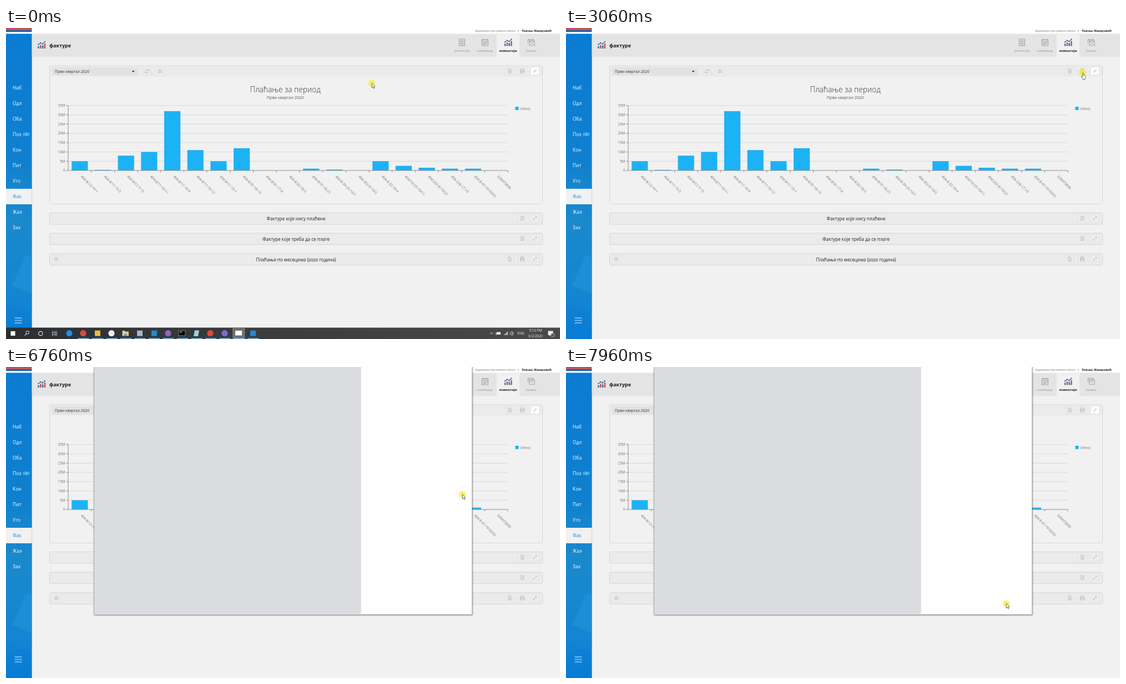
Recreate the animation shown at these times as an HTML page. Size 998x561 px, loop 8000 ms.

```html
<!DOCTYPE html>
<html lang="sr">
<head>
<meta charset="utf-8">
<style>
html, body { margin: 0; width: 100%; height: 100%; overflow: hidden; background: #f1f1f1; }
svg { display: block; width: 998px; height: 561px; font-family: "Open Sans", "Noto Sans", sans-serif; }
</style>
</head>
<body>
<svg id="stage" viewBox="0 0 998 561"></svg>
<script>
const LOOP = 8000;
const stage = document.getElementById('stage');

const attrs = o => Object.entries(o).map(([k, v]) => `${k}="${v}"`).join(' ');
const rect = (x, y, width, height, fill, more = {}) => `<rect ${attrs({ x, y, width, height, fill, ...more })}/>`;
const circle = (cx, cy, r, fill, more = {}) => `<circle ${attrs({ cx, cy, r, fill, ...more })}/>`;
const path = (d, stroke, width = 1, fill = 'none') => `<path ${attrs({ d, stroke, fill, 'stroke-width': width })}/>`;
const text = (s, x, y, size, fill, more = {}) => `<text ${attrs({ x, y, 'font-size': size, fill, ...more })}>${s}</text>`;
const at = (x, y, body) => `<g transform="translate(${x} ${y})">${body}</g>`;
const group = (id, body) => `<g id="${id}">${body}</g>`;
const mid = { 'text-anchor': 'middle' };
const bold = { 'font-weight': 700 };

// Icons are drawn around their own centre.
const icons = {
  file: c => path('M-2.5-3.8H1L3-1.8V3.8H-2.5ZM1-3.8V-1.8H3M-1 .2H1.5M-1 2H1.5', c, .8),
  print: c => path('M-2.5-1.2V-3.8H2.5V-1.2M-2.5 2.2H-4V-1.2H4V2.2H2.5M-2.5 .8H2.5V3.8H-2.5Z', c, .75),
  expand: c => path('M-2.8 2.8L2.8-2.8M.6-2.8H2.8V-.6M-2.8 .6V2.8H-.6', c, .8),
  shrink: c => path('M-3 3L-.5 .5M3-3L.5-.5M-2.4 .5H-.5V2.4M.5-2.4V-.5H2.4', c, .8),
  refresh: c => path('M-3.3-.6A3.4 3.4 0 0 1 2.9-1.8M3.3-3.6V-1.3H1M3.3 .6A3.4 3.4 0 0 1-2.9 1.8M-3.3 3.6V1.3H-1', c, .9),
  sliders: c => path('M-4-2.5H4M-4 0H4M-4 2.5H4M-1.8-3.4V-1.6M1.8-.9V.9M-.8 1.6V3.4', c, .8),
  cabinet: c => path('M-5-6.3H5V6.3H-5ZM-5-2.1H5M-5 2.1H5M-1.7-4.2H1.7M-1.7 0H1.7M-1.7 4.2H1.7', c, 1.1),
  calendar: c => path('M-5.5-4.8H5.5V6H-5.5ZM-5.5-2H5.5M-3-6.5V-4M3-6.5V-4', c, 1.2)
    + path('M-3.5 .3H4M-3.5 2.2H4M-3.5 4.1H2', c, 1),
  mail: c => path('M-6 1.5V-5.6H4V-3.5M-6-5.6L-1-2 4-5.6M-3.5-2.6H6V5.2H-3.5ZM-3.5-2.6L1.3 1.6 6-2.6', c, 1),
  chart: () => [[-6.7, 4], [-2.9, 6.5], [.9, 5.5], [4.7, 9]]
    .map(([x, h], i) => rect(x, 6.5 - h, 2.5, h, i % 2 ? '#c9504f' : '#2077bd')).join('')
    + path('M-5.8-.5L-1.8-3.6 2-1.8 6-5.6', '#24639d', 1.1)
    + [[-5.8, -.5], [-1.8, -3.6], [2, -1.8], [6, -5.6]].map(([x, y]) => circle(x, y, 1.1, '#24639d')).join('')
};
const icon = (name, x, y, color) => at(x, y, icons[name](color));

function button(name, x, y, color = '#b4b4b4', fill = '#ededed') {
  return rect(x - 7.5, y - 7, 15, 14, fill, { rx: 1, stroke: '#e0e0e0', 'stroke-width': .7 }) + icon(name, x, y, color);
}

function sidebar() {
  const items = ['Наб', 'Одл', 'Оба', 'Поз', 'Кон', 'Пит', 'Уго', 'Фак', 'Жал', 'Зах'];
  let s = `<linearGradient id="blue" x2="0" y2="1"><stop stop-color="#0a7cd2"/><stop offset=".4" stop-color="#0f80cf"/>
    <stop offset=".62" stop-color="#1b87ca"/><stop offset=".85" stop-color="#1384d0"/><stop offset="1" stop-color="#087bd6"/></linearGradient>`;
  s += rect(0, 10, 46.7, 551, 'url(#blue)');
  s += path('M0 258L46.7 274V515L0 496Z', 'none', 0, '#1890d330');
  s += path('M36 409L46.7 413V480L10 465Z', 'none', 0, '#2a9ddd58');
  s += rect(0, 0, 46.7, 3.7, '#c84b50') + rect(0, 3.7, 46.7, 3.3, '#1c5d9e') + rect(0, 7, 46.7, 3.4, '#fff');
  s += rect(0, 290, 46.7, 28, '#f1f1f1');
  items.forEach((label, i) => {
    s += text(label, 12, 110.7 + 28.05 * i, 8.5, i === 7 ? '#2489d2' : '#fff');
  });
  s += rect(30, 188.5, 13, 6.6, '#37a8ec', { rx: 3.3 }) + text('6', 36.5, 193.5, 4.5, '#d9efff', mid);
  return s + path('M15.5 523H28.5M15.5 527.5H28.5M15.5 532H28.5', '#76b9e9', 1.9);
}

function header() {
  let s = rect(46.7, 0, 951.3, 10.5, '#fff') + rect(46.7, 10.5, 951.3, 41.5, '#e4e4e4') + rect(884, 10.5, 41, 41.5, '#f1f1f1');
  s += text('Административни пакет', 845, 7.4, 5.55, '#a3a9ad', bold) + circle(923, 5.3, .9, '#777');
  s += text('Томаш Жмировић', 929, 7.4, 5.65, '#222', bold);
  s += icon('chart', 64, 30.5) + text('фактуре', 78, 34.6, 8.9, '#1b1b1b', bold);
  [['cabinet', 'регистар'], ['calendar', 'календар'], ['chart', 'извештаји'], ['mail', 'пошта']].forEach(([name, label], i) => {
    const x = 821.3 + 41.6 * i;
    s += icon(name, x, 26, '#a4a4a4') + text(label, x, 42.6, 5.7, i === 2 ? '#1b1b1b' : '#b0b0b0', { ...mid, ...bold });
  });
  return s;
}

function chart() {
  const left = 112, step = 792 / 19, base = 257, unit = 117 / 35;
  const values = [5, .35, 8, 10, 32, 11, 5, 12, 0, 0, 1, .5, 0, 5, 2.5, 1.5, 1, 1, 0];
  const labels = ['404-8/13-19-1', '404-8/11-19-5', '404-8/11-7-15', '404-8/11-19-11', '404-8/11-19-9',
    '404-8/11-19-12', '404-8/11-19-1', '404-8/31-18-12', '404-8/31-17-8', '404-8/32-18-5', '404-8/31-18-21',
    '404-8-39-25-10/1', '404-202-8-19/2', '404-8-32-18-4', '404/16-25-19/11', '404-202-8-19/22',
    '404-228-17-19', '404-8-41-19-03/02', '636475896'];
  let s = text('Плаћање за период', 503, 116, 13.7, '#333', { ...mid, 'font-weight': 300 });
  s += text('Први квартал 2020', 503, 128.3, 7.25, '#555', mid);
  for (let m = 0; m <= 35; m += 5) {
    const y = base - m * unit;
    if (m) s += path(`M${left} ${y}H904`, '#d5d5d5', .9);
    s += path(`M${left - 3.5} ${y}H${left}`, '#777', .9);
    s += text(m ? m + 'M' : '0', 106.5, y + 2.3, 6.3, '#707070', { 'text-anchor': 'end' });
  }
  values.forEach((v, i) => {
    const x = left + step * (i + .5);
    if (v) s += rect(x - 14.6, base - v * unit, 29.2, v * unit, '#1db2f5');
    s += path(`M${left + step * (i + 1)} ${base}v3.5`, '#777', .9);
    s += text(labels[i], 0, 0, 6.3, '#707070', { transform: `translate(${x + 1.4} 268.4) rotate(45)` });
  });
  s += path(`M${left} 139.5V${base}H904`, '#858585', .9);
  return s + rect(917.5, 142, 6, 6, '#1db2f5') + text('Износ', 927, 147.5, 6.2, '#777');
}

function panels() {
  const edge = { rx: 2, stroke: '#d2d2d2', 'stroke-width': .9 };
  const heading = { ...mid, style: 'font-variant-numeric:oldstyle-nums' };
  const printer = '#a3abc0';
  let s = rect(78.5, 68, 888, 249.3, '#f1f1f1', edge) + rect(79, 68.5, 887, 19, '#ebebeb');
  s += rect(83, 71, 155, 14.5, '#e4e2e1', { rx: 1 }) + text('Први квартал 2020', 88, 80.9, 6.75, '#333');
  s += path('M226.8 77.2H231.6L229.2 80Z', 'none', 0, '#222');
  s += button('refresh', 254, 78) + button('sliders', 277.5, 78);
  s += button('file', 907, 77.5) + button('print', 930, 77.5, printer) + button('shrink', 953, 77.5, '#aaa', '#fff');
  ['Фактуре које нису плаћене', 'Фактуре које треба да се плате', 'Плаћање по месецима (2020 година)'].forEach((label, i) => {
    const y = 343.7 + 36.8 * i;
    s += rect(78.5, y - 10.3, 888, 20.6, '#ebebeb', edge) + text(label, 522.5, y + 3.2, 8.1, '#222', heading);
    s += button('expand', 953, y - .7);
    s += i < 2 ? button('file', 930, y - .7)
      : button('sliders', 90.5, y - .7) + button('file', 907, y - .7) + button('print', 930, y - .7, printer);
  });
  return s;
}

function taskbar() {
  const w = '#e8eaec';
  let s = '<linearGradient id="bar"><stop stop-color="#2c2f32"/><stop offset="1" stop-color="#4a4a4a"/></linearGradient>';
  s += rect(0, 540.5, 998, 20.5, 'url(#bar)') + rect(408, 540.5, 22.5, 20.5, '#707070');
  s += rect(8.5, 547, 8, 8, '#fff');
  s += circle(38.8, 549.3, 2.8, 'none', { stroke: w }) + path('M36.8 551.4L33.8 554.5', w, 1.1);
  s += circle(62.3, 551, 3.7, 'none', { stroke: w, 'stroke-width': 1.2 });
  s += path('M84 546.5V549M84 555.5V553M88.5 546.5V549M88.5 555.5V553M83.5 549.2H89V552.8H83.5ZM91.3 546.5V555.5', w, .8);
  const dots = { 114: '#1a8fe8', 139: '#dd4b3e', 190: '#f0f0f0', 292: '#9b62b8', 368: '#dd4b3e', 394: '#7d6bd0' };
  const squares = { 165: '#e9bd3c', 241: '#a9b7c2', 267: '#2489ce', 445: '#2a86d8' };
  for (const x in dots) s += circle(x, 550.7, 5.6, dots[x]);
  for (const x in squares) s += rect(x - 5, 545.7, 10, 10, squares[x]);
  s += path('M209.5 546H214L215 547.5H221V555.5H209.5Z', 'none', 0, '#f3cd62') + rect(212.5, 552, 5.5, 3.5, '#469fdc');
  s += rect(311, 546, 12, 9, '#080808', { stroke: '#aaa', 'stroke-width': .7 }) + path('M313 548.5H317', '#fff');
  s += path('M340 545.5H348L346 556H338Z', 'none', 0, '#a6cfdd') + rect(413, 546, 12, 8.5, '#fff');
  for (let i = 0; i < 13; i++) s += rect(129.5 + 25.5 * i, 559.5, 20, 1.5, '#76b9ed');
  s += path('M872 552.3L874.7 549.5 877.4 552.3', w) + rect(884, 548.5, 7, 4.5, w) + path('M883 549V554', w);
  s += path('M897.5 554V552.5M899.5 554V551M901.5 554V549.3M903.3 554V547.5', w, 1.1);
  s += path('M908 549.5H909.5L912 547.2V554.6L909.5 552.4H908ZM913.5 549Q915 551 913.5 553', w, .8);
  s += text('ENG', 927.5, 553.1, 6.2, w, mid) + text('5:10 PM', 954, 548.4, 6.2, w, mid) + text('6/2/2020', 954, 557.6, 6.2, w, mid);
  s += path('M976.5 546.5H985.5V554H981L979 556V554H976.5Z', 'none', 0, w);
  return s + circle(985, 554, 3.2, '#444', { stroke: w, 'stroke-width': .6 }) + text('1', 985, 555.8, 4.6, w, mid);
}

const arrow = path('M.2-.6V8L2.1 6.2 3.4 9.1 4.8 8.5 3.5 5.7H6Z', '#333', .7, '#fff');
const hand = path('M.6 1.5Q1.5 .7 2.3 1.6V5L5.3 5.7Q6.2 6 6 7L5.2 10.5V12.5H1V11L-1.7 8Q-1.6 6.7-.3 7.1L.5 8Z', '#333', .7, '#fff');

stage.innerHTML = `<filter id="soft" x="-5%" y="-5%" width="110%" height="110%"><feGaussianBlur stdDeviation="1.3"/></filter>`
  + rect(0, 0, 998, 561, '#f1f1f1') + sidebar() + header() + panels() + chart()
  + group('taskbar', taskbar())
  + group('status', rect(-1, 549.7, 333, 13, '#dee1e6', { stroke: '#d0d3d8', 'stroke-width': .5 })
    + text('Establishing secure connection...', 2.5, 557.7, 5.95, '#444'))
  + group('popup', rect(158.5, -5, 682, 453, '#000', { opacity: .45, filter: 'url(#soft)' })
    + rect(159, -5, 680.6, 451.7, '#fff', { stroke: '#a5a5a5', 'stroke-width': .7 })
    + group('preview', rect(159.3, 0, 480.4, 446.5, '#dadce0')))
  + group('tooltip', rect(935.5, 89.5, 40, 13, '#fff', { stroke: '#8a8a8a', 'stroke-width': .8 })
    + text('Штампај', 955.5, 98.1, 6, '#555', mid))
  + group('cursor', circle(0, 0, 6.2, '#fbee28', { opacity: .72 })
    + group('arrow', arrow) + group('hand', hand));

const part = Object.fromEntries(['taskbar', 'status', 'popup', 'preview', 'tooltip', 'cursor', 'arrow', 'hand']
  .map(id => [id, document.getElementById(id)]));
const show = (el, on) => el.setAttribute('visibility', on ? 'inherit' : 'hidden');

// Pointer strokes: first and last step in ms, step count, end point, vertical bow.
const start = [659, 100];
const strokes = [
  [490, 1180, 7, [903, 99], 18.5],
  [1300, 1760, 5, [931, 88], 0],
  [2040, 2340, 4, [930, 80], 0],
  [6110, 6620, 5, [862, 176], 0],
  [6760, 6880, 2, [782, 284], 0],
  [7000, 7480, 5, [793, 396], 0],
  [7600, 7960, 4, [793, 427], 0]
];

function pointer(t) {
  let from = start;
  for (const [first, last, count, to, bow] of strokes) {
    if (t < first) break;
    const step = Math.floor((t - first) / (last - first) * (count - 1) + 1e-6) + 1;
    if (step >= count) { from = to; continue; }
    const u = step / count;
    return [from[0] + (to[0] - from[0]) * u, from[1] + (to[1] - from[1]) * u + bow * 4 * u * (1 - u)];
  }
  return from;
}

function render(t) {
  const overLink = t >= 2040 && t < 6110;
  const [x, y] = pointer(t);
  part.cursor.setAttribute('transform', `translate(${x} ${y})`);
  show(part.arrow, !overLink);
  show(part.hand, overLink);
  show(part.taskbar, t < 70);
  show(part.tooltip, t >= 2770 && t < 3060);
  show(part.status, t >= 5040 && t < 6240);
  show(part.popup, t >= 5970);
  show(part.preview, t >= 6760);
}

const origin = performance.now();
function tick() {
  render((performance.now() - origin) % LOOP);
  requestAnimationFrame(tick);
}
render(0);
requestAnimationFrame(tick);
</script>
</body>
</html>
```
